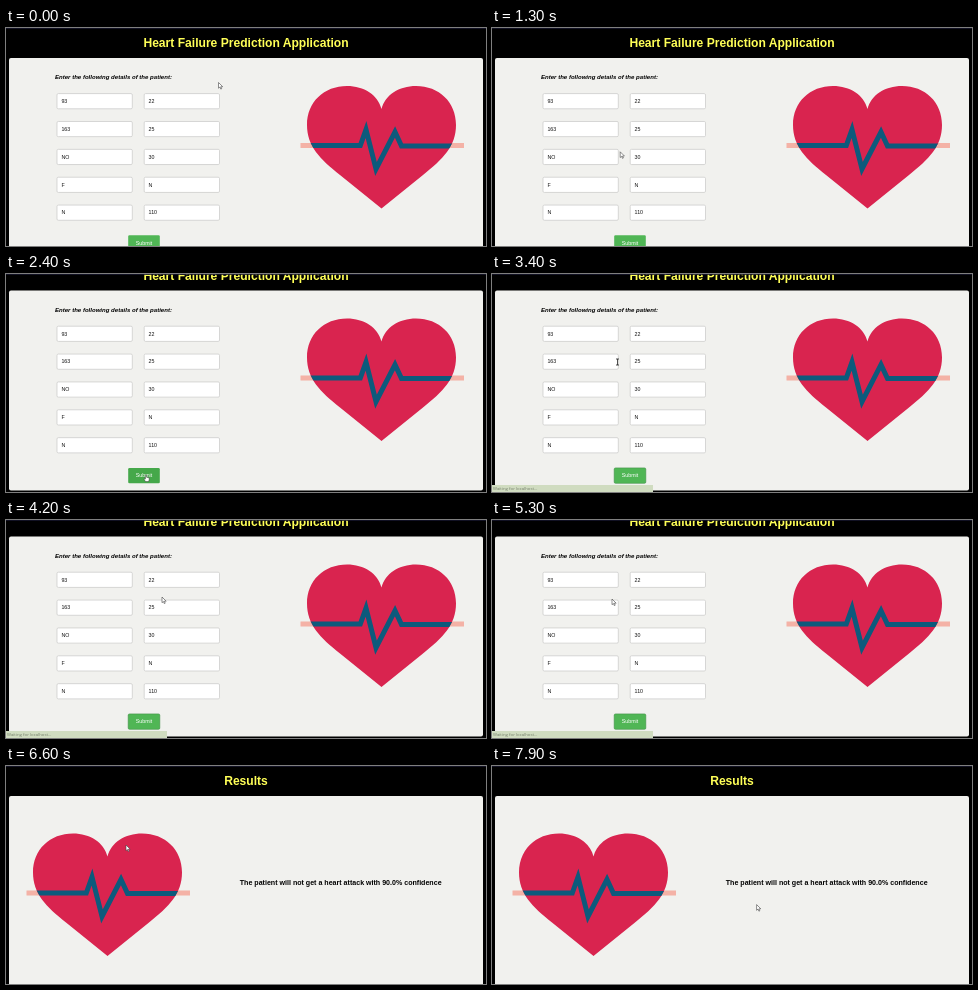
Animation, 480 px wide and 218 px high, one loop 8000 ms. Source, as an HTML page:

```html
<!DOCTYPE html>
<html lang="en">
<head>
<meta charset="utf-8">
<title>Heart Failure Prediction</title>
<style>
  html, body { margin: 0; width: 100%; height: 100%; overflow: hidden; background: #000; }
  svg { display: block; width: 480px; height: 218px; font-family: "Liberation Sans", Arial, sans-serif; }
  .title { font-size: 12.1px; font-weight: bold; fill: #ffff57; text-anchor: middle; }
  .lead { font-size: 6.05px; font-weight: bold; font-style: italic; }
  .panel { fill: #f1f1ee; }
  .field rect { fill: #fff; stroke: #c8c8c6; stroke-width: .7; }
  .field text { font-size: 5.3px; fill: #111; }
  .button text { font-size: 5.3px; fill: #fff; text-anchor: middle; }
  .verdict { font-size: 7.09px; font-weight: bold; }
  .status text { font: 4.3px "Open Sans", sans-serif; fill: #76806c; }
</style>
</head>
<body>
<svg viewBox="0 0 480 218">
  <defs>
    <path id="shape" d="M375.5 81C372 67 358 58 341 58C318 58 301 74 301 97C301 118 314 131 334 147L375.5 180.5L417 147C437 131 450 118 450 97C450 74 433 58 410 58C393 58 379 67 375.5 81Z"/>
    <clipPath id="inside"><use href="#shape"/></clipPath>
    <g id="heart">
      <path d="M294.5 117.5H458" stroke="#f4b2a6" stroke-width="5"/>
      <use href="#shape" fill="#d9244f"/>
      <path d="M294 117.5H354.3L360 101.5L370 141L389 104L395.5 118H458" clip-path="url(#inside)"
            fill="none" stroke="#0d5a7c" stroke-width="5" stroke-miterlimit="10"/>
    </g>
  </defs>
  <rect width="480" height="218"/>

  <g id="form">
    <text class="title" x="240" y="19.3">Heart Failure Prediction Application</text>
    <rect class="panel" x="3" y="30" width="474" height="200" rx="2"/>
    <text class="lead" x="49" y="51.3">Enter the following details of the patient:</text>
    <g id="fields"></g>
    <g class="button">
      <rect id="submit" x="122.2" y="207.3" width="31.6" height="15.4" rx="1.3"/>
      <text x="138" y="216.6">Submit</text>
    </g>
    <use href="#heart"/>
  </g>

  <g id="results">
    <text class="title" x="240" y="19.3">Results</text>
    <rect class="panel" x="3" y="30" width="474" height="200" rx="2"/>
    <use href="#heart" x="-274" y="9.5"/>
    <text class="verdict" x="233.8" y="119.3">The patient will not get a heart attack with 90.0% confidence</text>
  </g>

  <rect width="480" height=".8" fill="#16162c"/>
  <g id="status" class="status">
    <rect y="211" width="161" height="7" fill="#d0dcc0"/>
    <text x="1" y="216.4">Waiting for localhost...</text>
  </g>

  <g id="pointer">
    <path id="arrow" d="M0 0V5.7L1.4 4.5L2.3 6.6L3.2 6.2L2.3 4.2H4.2Z" fill="#fff" stroke="#444" stroke-width=".6"/>
    <path id="beam" d="M-1.5 -3H1.5M0 -3V3M-1.5 3H1.5" fill="none" stroke="#222" stroke-width=".8"/>
    <path id="hand" d="M-.6 .4Q0 -.4 .6 .4V2.4L3.2 3V5L2.6 6.8H-.6L-2 4.2L-1.3 3.6L-.6 4.2Z" fill="#fff" stroke="#333" stroke-width=".5"/>
  </g>
</svg>

<script>
  const LOOP = 8000, STEP = 100;
  const $ = id => document.getElementById(id);

  const columns = [
    { x: 51, values: ["93", "163", "NO", "F", "N"] },
    { x: 138.2, values: ["22", "25", "30", "N", "110"] }
  ];
  const field = { w: 75.3, h: 15.2, top: 65.6, pitch: 27.87 };

  $("fields").innerHTML = columns.map(({ x, values }) => values.map((value, i) => {
    const y = field.top + i * field.pitch;
    return `<g class="field"><rect x="${x}" y="${y}" width="${field.w}" height="${field.h}" rx="1.3"/>
      <text x="${x + 4.4}" y="${y + 9.4}">${value}</text></g>`;
  }).join("")).join("");

  // Each row: time, then values
  const cursorPath = [
    [0, 212.5, 54.5], [300, 165, 100], [600, 112, 151], [900, 132, 132], [1300, 128.2, 123.8],
    [1600, 128.2, 123.8], [1900, 130, 155], [2400, 140, 200.8],
    [2900, 140, 200.8], [3400, 125.5, 88], [3800, 140, 78], [4200, 156, 77],
    [4900, 156, 77], [5300, 120, 79],
    [7100, 120, 79], [7300, 420.3, 101],
    [7500, 420.3, 101], [7700, 310, 144], [7900, 264.6, 138.6]
  ];
  const scrollPath = [[1500, 0], [1800, 13.4]];
  const statusFade = [[3000, 0], [3200, 1], [6400, 1], [6600, 0]];

  function sample(path, t) {
    if (t <= path[0][0]) return path[0].slice(1);
    const i = path.findIndex(p => p[0] >= t);
    if (i < 0) return path[path.length - 1].slice(1);
    const a = path[i - 1], b = path[i], k = (t - a[0]) / (b[0] - a[0]);
    return a.slice(1).map((v, n) => v + (b[n + 1] - v) * k);
  }

  const within = (px, py, x, y, w, h) => px >= x && px <= x + w && py >= y && py <= y + h;

  function cursorKind(x, y) {
    if (within(x, y, 122, 207.3, 32, 15.4)) return "hand";
    const inField = columns.some(c => c.values.some((_, i) =>
      within(x, y, c.x, field.top + i * field.pitch, field.w, field.h)));
    return inField ? "beam" : "arrow";
  }

  function draw(t) {
    const onResults = t >= 6000;
    const [x, y] = sample(cursorPath, t);
    const [scroll] = sample(scrollPath, t);
    const kind = onResults ? "arrow" : cursorKind(x, y + scroll);

    $("form").style.display = onResults ? "none" : "";
    $("results").style.display = onResults ? "" : "none";
    $("form").setAttribute("transform", `translate(0 ${-scroll})`);
    $("status").setAttribute("opacity", sample(statusFade, t)[0]);

    const submit = $("submit");
    submit.setAttribute("fill", kind === "hand" ? "#45a84a" : "#50b655");
    submit.setAttribute("stroke", t >= 2500 ? "#3f9145" : "none");
    submit.setAttribute("stroke-width", .6);

    $("pointer").setAttribute("transform", `translate(${x} ${y})`);
    for (const id of ["arrow", "beam", "hand"]) $(id).style.display = id === kind ? "" : "none";
  }

  const start = performance.now();
  function tick() {
    const t = (performance.now() - start) % LOOP;
    draw(Math.floor(t / STEP) * STEP);
    requestAnimationFrame(tick);
  }
  tick();
</script>
</body>
</html>
```
